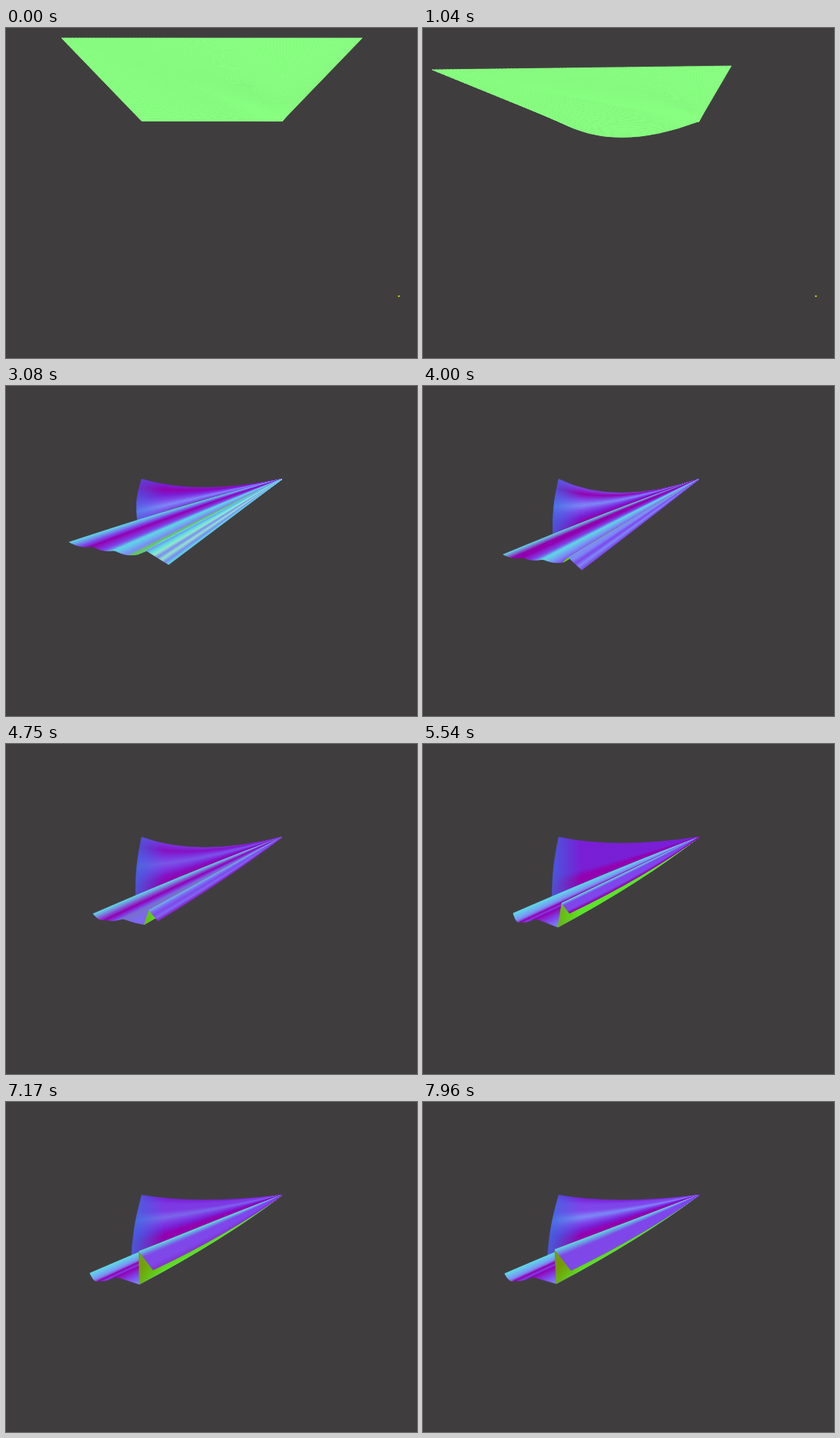
Animation of 533 by 427 pixels, one loop 8000 ms. Source, as an HTML page with a canvas:

```html
<!DOCTYPE html>
<html>
<head>
<meta charset="utf-8">
<title>Falling cloth</title>
<style>
  html, body { margin: 0; width: 100%; height: 100%; overflow: hidden; background: #403d3f; }
  canvas { display: block; }
</style>
</head>
<body>
<canvas id="stage" width="533" height="427"></canvas>
<script>
const ctx = document.getElementById('stage').getContext('2d');
const LOOP = 8000, STEPS = 28;
const PIN = [176, 120.5], APEX = [358, 120.5];   // the two pinned corners
const { sin, abs, PI } = Math;

const palette = {
  g: [137, 255, 130],  // open cloth
  G: [106, 248, 70],
  n: [90, 232, 30],    // underside
  o: [115, 165, 0],
  a: [150, 238, 205],
  c: [95, 222, 232],
  b: [126, 140, 250],
  v: [128, 70, 238],
  V: [122, 30, 216],
  p: [148, 0, 178]
};

const mix = (a, b, u) => a + (b - a) * u;
const mixAll = (a, b, u) => a.map((v, i) => mix(v, b[i], u));
const rgb = c => `rgb(${c.map(Math.round)})`;
const clamp = (v, hi) => Math.min(Math.max(v, 0), hi);

// The cloth is four folds, each a fan from APEX to the tail:
// back (PIN to left), front (left to base), under (base to tip), flap (tip to right).
// sag bends the top edge, tuck slides the back sheet behind the front, curl rolls the rest.
const key = (t, left, base, tip, right, sag, tuck, curl, bands) =>
  ({ t, shape: [...left, ...base, ...tip, ...right, sag, tuck, curl], bands: bands.split(' ') });

// The open sheet falls and drifts left.
function open(t) {
  const v = (t - 250) / 790;
  const left = [72 - 68 * sin(v * 1.08), 13 + 41 * v * v];
  const right = [462 - 62 * v * v, 13 + 36 * v * v];
  return key(t, left, mixAll(left, right, 1 / 3), mixAll(left, right, 2 / 3), right,
    42 * v, 0, 0, 'g g g g');
}

const keys = [
  ...[250, 645, 1040, 1400].map(open),
  key(1830, [36, 141], [163, 170], [280, 147], [323, 142], 27, 0.39, 0, 'Vba ggGg gGg gaa'),
  key(3080, [82, 202], [170, 218], [182, 213], [211, 231], 22, 0.28, 0, 'VpVvbv cvpvcbn c bcababc'),
  key(4000, [104, 218], [182, 228], [189, 222], [206, 238], 36, 0.22, 1, 'vpvbvVp cppvcbv n bbvbv'),
  key(5540, [117, 219], [175, 237], [180, 206], [190, 219], 16, 0.18, 11, 'VVVVVpp cbpvpvb n cvvvp'),
  key(7960, [106, 222], [173, 235], [171, 191], [192, 218], 13, 0.19, 10, 'VvvbvVpp cbpvpvb noo cvvv')
];

// Rate of change of value j at key i; the ends are at rest.
function slope(i, j) {
  const a = keys[i - 1], b = keys[i + 1];
  return a && b ? (b.shape[j] - a.shape[j]) / (b.t - a.t) : 0;
}

function pose(t) {
  t = Math.min(Math.max(t, keys[0].t), keys[keys.length - 1].t);
  let i = 0;
  while (i < keys.length - 2 && t >= keys[i + 1].t) i++;
  const a = keys[i], b = keys[i + 1], h = b.t - a.t, u = (t - a.t) / h;
  const ease = u * u * (3 - 2 * u);
  const shape = a.shape.map((v, j) => mix(v, b.shape[j], ease)
    + h * u * (1 - u) * ((1 - u) * slope(i, j) - u * slope(i + 1, j)));
  const color = (fold, w) => mixAll(bandColor(a.bands[fold], w), bandColor(b.bands[fold], w), u);
  return { folds: makeFolds(shape), color };
}

function bandColor(band, u) {
  const x = u * (band.length - 1), i = Math.floor(x);
  return mixAll(palette[band[i]], palette[band[i + 1] || band[i]], x - i);
}

// A ray is its tail point and the control point of its curve to APEX.
function ray(x, y, bend, reach = 0.6) {
  const [cx, cy] = mixAll([x, y], APEX, reach);
  return [x, y, cx, cy + bend];
}

function rayPoint([x, y, cx, cy], s) {
  const c = [cx, cy];
  return mixAll(mixAll([x, y], c, s), mixAll(c, APEX, s), s);
}

// Each fold gives its ray at u from 0 to 1.
function makeFolds([lx, ly, bx, by, tx, ty, rx, ry, sag, tuck, curl]) {
  const lift = -20 * tuck;
  const hem = rayPoint(ray(lx, ly, lift), tuck);
  return [
    u => ray(mix(PIN[0], hem[0], u) - 12 * tuck * sin(PI * u), mix(PIN[1], hem[1], u),
      mix(sag, lift, u), 0.4),
    u => ray(mix(lx, bx, u) - curl * sin(PI * u),
      mix(ly, by, u) + curl / 2 * sin(2 * PI * u) + 10 * tuck * abs(sin(3 * PI * u)),
      mix(lift, curl, u)),
    u => ray(mix(bx, tx, u), mix(by, ty, u), mix(curl, 0, u)),
    u => ray(mix(tx, rx, u), mix(ty, ry, u), mix(0, curl, u))
  ];
}

function slice(p, q, fill) {
  ctx.beginPath();
  ctx.moveTo(p[0], p[1]);
  ctx.quadraticCurveTo(p[2], p[3], ...APEX);
  ctx.quadraticCurveTo(q[2], q[3], q[0], q[1]);
  ctx.closePath();
  ctx.fillStyle = ctx.strokeStyle = fill;
  ctx.fill();
  ctx.stroke();
}

// The back turns blue and the underside olive towards the free edge.
const tints = { 0: [58, 105, 225], 2: [115, 150, 0] };

function tinted(color, tint, amount) {
  const grad = ctx.createLinearGradient(166, 0, 205, 0);
  grad.addColorStop(0, rgb(mixAll(color, tint, amount)));
  grad.addColorStop(1, rgb(color));
  return grad;
}

function draw(t) {
  ctx.fillStyle = '#403d3f';
  ctx.fillRect(0, 0, 533, 427);
  if (t < 1400) {
    ctx.fillStyle = '#d8d800';
    ctx.fillRect(508.5, 346, 2, 2);
  }
  const { folds, color } = pose(t);
  const amount = clamp((t - 2200) / 1500, 0.8);
  ctx.lineWidth = 0.7;
  ctx.lineJoin = 'round';
  folds.forEach((fold, f) => {
    for (let s = 0; s < STEPS; s++) {
      const c = color(f, (s + 0.5) / STEPS);
      slice(fold(s / STEPS), fold((s + 1) / STEPS),
        tints[f] && amount ? tinted(c, tints[f], amount) : rgb(c));
    }
  });
}

const start = performance.now();
function frame() {
  draw((performance.now() - start) % LOOP);
  requestAnimationFrame(frame);
}
frame();
</script>
</body>
</html>
```
